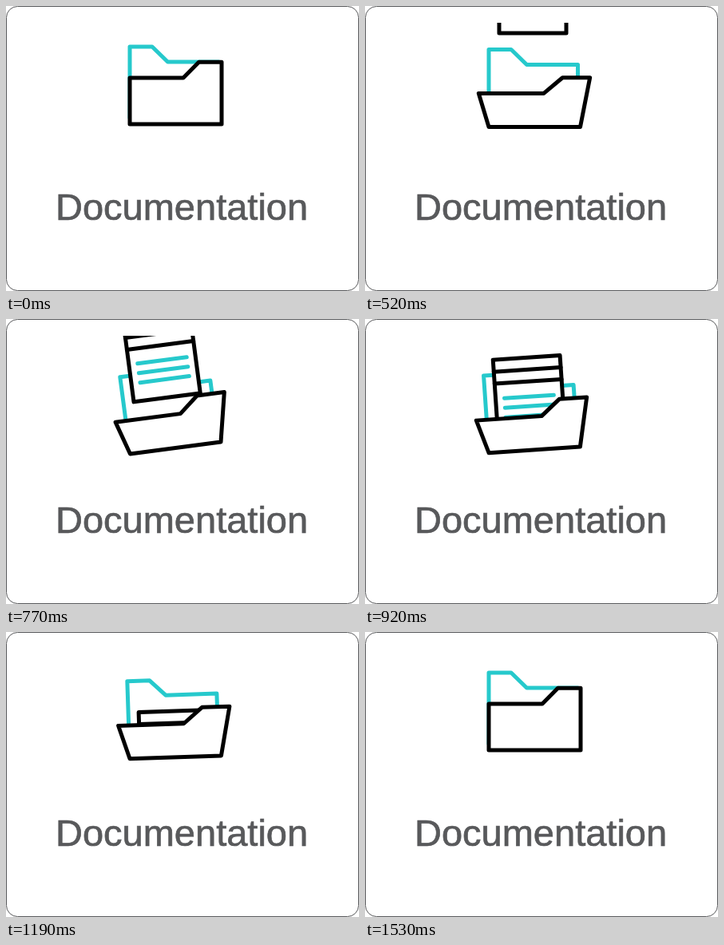
An HTML page with a canvas for the animation above (1.96 s loop, 442 by 357 pixels).

```html
<!DOCTYPE html>
<html lang="en">
<head>
<meta charset="utf-8">
<title>Documentation</title>
<style>
  html, body { margin: 0; width: 100%; height: 100%; overflow: hidden; background: #fff; }
  canvas { display: block; }
</style>
</head>
<body>
<canvas id="stage" width="442" height="357"></canvas>
<script>
const ctx = document.getElementById('stage').getContext('2d');
const LOOP = 1960;
const BLACK = '#000', TEAL = '#26c9cc', GREY = '#58595b';

const progress = (t, from, to) => Math.min(Math.max((t - from) / (to - from), 0), 1);

function ease(t, from, to) {
  const u = progress(t, from, to);
  return u * u * (3 - 2 * u);
}

function steepEase(t, from, to) {
  const u = progress(t, from, to);
  return u * u * u * (10 - 15 * u + 6 * u * u);
}

// 0 = folder shut, 1 = flap tipped fully forward
const opening = t => ease(t, 55, 570) - ease(t, 1250, 1530);

// The folder dips under the sheet and comes back up
const sink = t => 8 * (1 - Math.cos(2 * Math.PI * progress(t, 340, 1500)));

// Rocking in degrees, each swing smaller than the one before
const tilt = t => -8.5 * ease(t, 590, 820) + 12.5 * ease(t, 820, 1065)
                - 6 * ease(t, 1065, 1175) + 2 * ease(t, 1175, 1290);

// Bottom edge of the sheet, relative to the bottom of the folder
const sheetBottom = t => -128 + 176 * steepEase(t, 296, 1410);

function poly(points, color, filled) {
  ctx.beginPath();
  points.forEach(([x, y]) => ctx.lineTo(x, y));
  if (filled) {
    ctx.closePath();
    ctx.fillStyle = '#fff';
    ctx.fill();
  }
  ctx.strokeStyle = color;
  ctx.stroke();
}

function drawCard() {
  ctx.fillStyle = '#fff';
  ctx.fillRect(0, 0, 442, 357);
  ctx.strokeStyle = ctx.fillStyle = GREY;
  ctx.lineWidth = 1;
  ctx.beginPath();
  ctx.roundRect(0.5, 0.5, 441, 356, 14);
  ctx.stroke();
  ctx.font = '47px "Liberation Sans", Arial, sans-serif';
  ctx.lineWidth = 0.7;
  ctx.fillText('Documentation', 62, 268);
  ctx.strokeText('Documentation', 62, 268);
}

function drawBack() {
  poly([[-57, -8], [-57, -97], [-29, -97], [-9.5, -78], [54.5, -78], [54.5, -8]], TEAL);
}

function drawSheet(bottom) {
  const left = -44, right = 40, top = bottom - 96;
  const rule = (y, inset, color) => poly([[left + inset, y], [right - inset, y]], color);
  ctx.save();
  ctx.beginPath();
  ctx.rect(-100, -300, 200, 300);
  ctx.clip();
  poly([[left, top], [right, top], [right, bottom], [left, bottom]], BLACK, true);
  for (let i = 1; i <= 2; i++) rule(top + 15 * i, 0, BLACK);
  for (let i = 0; i < 3; i++) rule(bottom - 23 - 12 * i, 11, TEAL);
  ctx.restore();
}

function drawFlap(open) {
  const spread = 13 * open;
  const edge = -58 + 16.3 * open, tab = edge - 19.7;
  poly([
    [-57 - spread, edge], [10 + 0.15 * spread, edge],
    [29.5 + 0.46 * spread, tab], [58 + 0.92 * spread, tab],
    [58 - 0.5 * open, 0], [-57, 0]
  ], BLACK, true);
}

function draw(t) {
  drawCard();
  ctx.save();
  ctx.beginPath();
  ctx.rect(100, 21, 240, 180);
  ctx.clip();
  ctx.translate(212, 148 + sink(t));
  ctx.rotate(tilt(t) * Math.PI / 180);
  ctx.lineWidth = 5;
  ctx.lineJoin = ctx.lineCap = 'round';
  drawBack();
  if (t > 440 && t < 1450) drawSheet(sheetBottom(t));
  drawFlap(opening(t));
  ctx.restore();
}

const start = performance.now();
function tick() {
  draw((performance.now() - start) % LOOP);
  requestAnimationFrame(tick);
}
tick();
</script>
</body>
</html>
```
